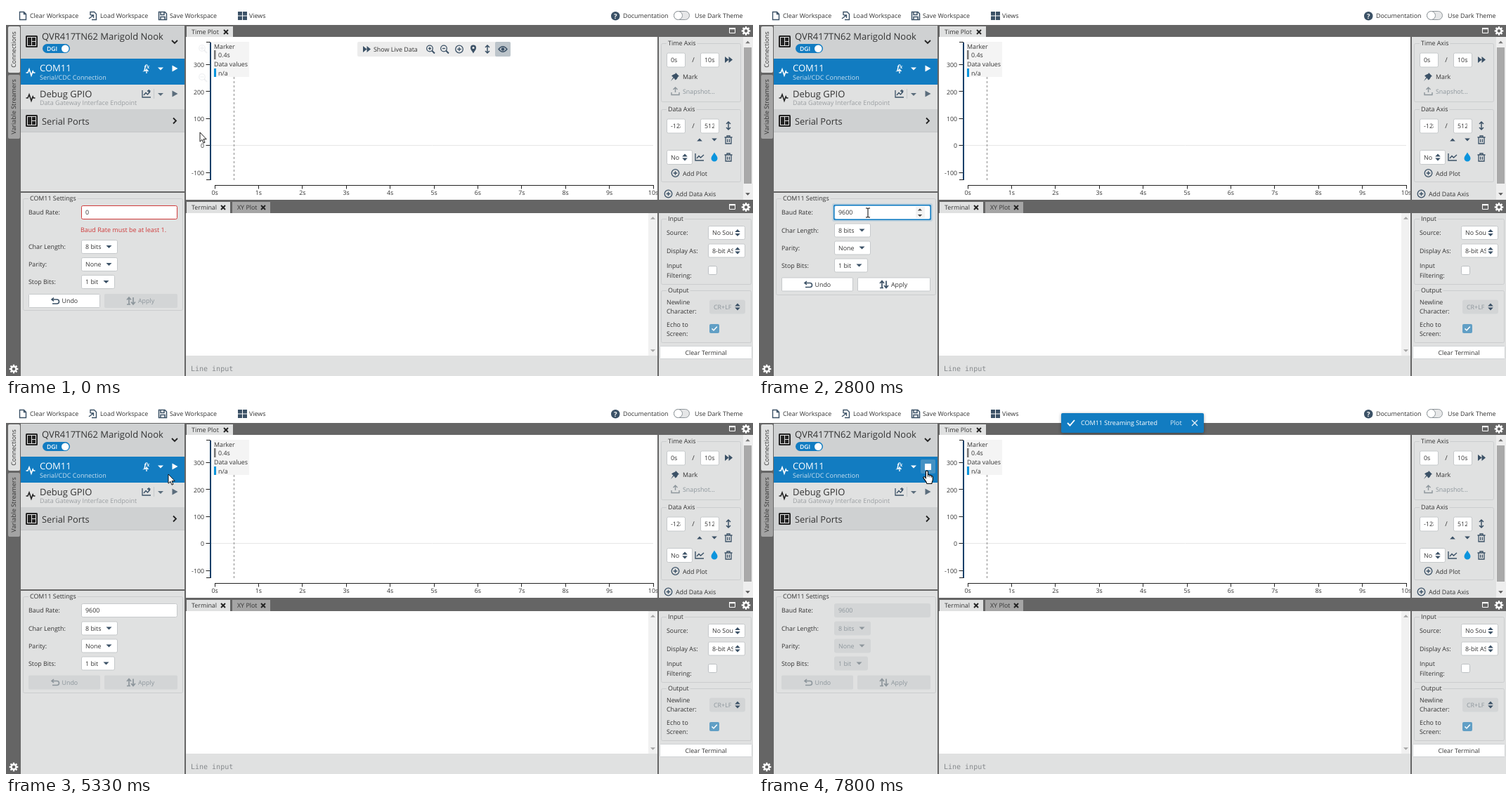
Animation of 1063 by 527 pixels, one loop 8 s. Source, as an HTML page with a canvas:

```html
<!DOCTYPE html>
<html lang="en">
<head>
<meta charset="utf-8">
<title>Serial streaming</title>
<style>
html, body { margin: 0; width: 100%; height: 100%; overflow: hidden; background: #fff; }
canvas { display: block; }
</style>
</head>
<body>
<canvas id="stage" width="1063" height="527"></canvas>
<script>
const ctx = document.getElementById('stage').getContext('2d');
const LOOP = 8000, STEP = 200 / 3;
const SANS = '"Open Sans", "Noto Sans", sans-serif';
const SERIF = '"Noto Serif", serif';
const MONO = '"DejaVu Sans Mono", monospace';
const INK = '#333', SLATE = '#3b5166', BLUE = '#127cc1', PANEL = '#e0e1e1', DARK = '#656565',
  HEAD = '#cfd1d2', OFF = '#d3d5d6', MUTED = '#8d969c', EDGE = '#c6c9cb', RED = '#cf3a3a';

function box(x, y, w, h, fill, stroke, r = 0) {
  ctx.beginPath();
  if (stroke) ctx.roundRect(x + .5, y + .5, w - 1, h - 1, r);
  else ctx.roundRect(x, y, w, h, r);
  if (fill) { ctx.fillStyle = fill; ctx.fill(); }
  if (stroke) { ctx.strokeStyle = stroke; ctx.lineWidth = 1; ctx.stroke(); }
}

// y is the middle of the capitals
function text(s, x, y, color = INK, size = 8.9, align = 'left', weight = 400, family = SANS) {
  ctx.font = `${weight} ${size}px ${family}`;
  ctx.textAlign = align;
  ctx.fillStyle = color;
  ctx.fillText(s, x, y + size * .36);
}

function clipped(s, x, y, w, color) {
  ctx.save();
  ctx.beginPath();
  ctx.rect(x, y - 8, w, 16);
  ctx.clip();
  text(s, x, y, color);
  ctx.restore();
}

function line(x1, y1, x2, y2, color, width = 1) {
  ctx.beginPath();
  ctx.moveTo(x1, y1);
  ctx.lineTo(x2, y2);
  ctx.strokeStyle = color;
  ctx.lineWidth = width;
  ctx.stroke();
}

function icon(d, x, y, stroke, width = 1.3, fill) {
  const p = new Path2D(d);
  ctx.save();
  ctx.translate(x, y);
  if (fill) { ctx.fillStyle = fill; ctx.fill(p); }
  if (stroke) { ctx.strokeStyle = stroke; ctx.lineWidth = width; ctx.stroke(p); }
  ctx.restore();
}
const solid = (d, x, y, color) => icon(d, x, y, null, 0, color);

const down = (x, y, c, r = 4) => solid(`M${-r} ${-r / 2}H${r}L0 ${r / 2}Z`, x, y, c);
const up = (x, y, c, r = 4) => solid(`M${-r} ${r / 2}H${r}L0 ${-r / 2}Z`, x, y, c);
const play = (x, y, c) => solid('M-3.5 -4.5L4.5 0L-3.5 4.5Z', x, y, c);
const cross = (x, y, c, r = 3, w = 1.9) => icon(`M${-r} ${-r}L${r} ${r}M${r} ${-r}L${-r} ${r}`, x, y, c, w);
const sorter = (x, y, c) => { up(x, y - 3, c, 3.8); down(x, y + 3, c, 3.8); };
const forward = (x, y) => solid('M-5.5 -4.5L0 0L-5.5 4.5ZM0 -4.5L5.5 0L0 4.5Z', x, y, SLATE);
const updown = (x, y) => icon('M0 -5V5M-3 -2.5L0 -5.5L3 -2.5M-3 2.5L0 5.5L3 2.5', x, y, SLATE, 1.5);
const pulse = (x, y, c) => icon('M-6.5 1H-4L-2 -4L1 5L3.2 -1L4.2 1H6.5', x, y, c, 1.6);
const pin = (x, y) => solid('M0 6C-2 2 -4 1 -4 -2A4 4 0 0 1 4 -2C4 1 2 2 0 6ZM0 -.4A1.6 1.6 0 1 0 0 -3.6A1.6 1.6 0 1 0 0 -.4', x, y, SLATE);

function ring(x, y, mark, r = 5.3) {
  ctx.beginPath();
  ctx.arc(x, y, r, 0, 7);
  ctx.strokeStyle = SLATE;
  ctx.lineWidth = 1.3;
  ctx.stroke();
  icon(mark, x, y, SLATE, 1.4);
}
const PLUS = 'M-2.8 0H2.8M0 -2.8V2.8', MINUS = 'M-2.5 0H2.5';

function lens(x, y, mark) {
  ring(x - 1, y - 1, mark, 4.3);
  line(x + 2, y + 2, x + 6, y + 6, SLATE, 1.9);
}

function gear(x, y) {
  ctx.save();
  ctx.translate(x, y);
  ctx.strokeStyle = '#fff';
  ctx.lineWidth = 2.4;
  ctx.beginPath();
  ctx.arc(0, 0, 3.5, 0, 7);
  ctx.stroke();
  for (let i = 0; i < 8; i++) {
    ctx.rotate(Math.PI / 4);
    line(4, 0, 6.3, 0, '#fff', 2.3);
  }
  ctx.restore();
}

function trash(x, y) {
  icon('M-5.5 -3.5H5.5M-2 -4V-5.5H2V-4M-4 -3V5.5H4V-3M-1.4 -1V3.5M1.4 -1V3.5', x, y, SLATE, 1.3);
}

function board(x, y) {
  box(x - 8.5, y - 8.5, 17, 17, '#222', null, 1.5);
  box(x - 6.5, y - 6.5, 13, 13, PANEL);
  box(x - 5.5, y - 5.5, 5, 11, '#222');
  box(x + .5, y - 5.5, 5, 5, '#222');
  box(x + .5, y + .5, 5, 5, '#222');
}

function group(title, x, y, w, h) {
  box(x, y, w, h, null, '#cbcdce', 2);
  ctx.font = `8.9px ${SANS}`;
  box(x + 8, y - 1, ctx.measureText(title).width + 4, 3, PANEL);
  text(title, x + 10, y);
}

function toolbar() {
  box(0, 0, 1063, 27, '#fff');
  icon('M-4.5 -5.5H1.5L4.5 -2.5V5.5H-4.5ZM1.5 -5.5V-2.5H4.5', 24, 14, SLATE, 1.4);
  icon('M-4 -1V-5.5H1.5L4.5 -2.5V5.5H-2M-6 4L0 -.5M-3.5 -1H.5V3', 124, 14, SLATE, 1.4);
  icon('M-5.5 -5.5H3L5.5 -3V5.5H-5.5ZM-3 -5V-1.5H2V-5M-3 5V1.5H3V5', 223, 14, SLATE, 1.5);
  for (let i = 0; i < 4; i++) box(330 + i % 2 * 7, 8 + (i >> 1) * 6.5, 6, 5.5, SLATE);
  [['Clear Workspace', 34], ['Load Workspace', 134], ['Save Workspace', 233], ['Views', 346],
    ['Documentation', 878], ['Use Dark Theme', 980]].forEach(([s, x]) => text(s, x, 14));
  box(861, 8, 12.5, 12.5, SLATE, null, 6.2);
  text('?', 867.2, 14.2, '#fff', 9.5, 'center', 700);
  box(950, 7, 23, 13, '#e6e7e8', '#8f969b', 6);
  box(950, 7, 13, 13, '#fff', '#8f969b', 6);
}

function sideTab(label, y, h, fill) {
  box(3, y, 17, h, fill, null, 2);
  ctx.save();
  ctx.translate(11, y + h / 2);
  ctx.rotate(-Math.PI / 2);
  text(label, 0, 0, INK, 8.9, 'center');
  ctx.restore();
}

function tab(label, x, y, w, fill) {
  box(x, y, w, 16, fill);
  text(label, x + 7, y + 8);
  cross(x + w - 10, y + 8, '#222');
}

function frame() {
  box(0, 27, 1063, 500, DARK);
  sideTab('Connections', 29, 66, PANEL);
  sideTab('Variable Streamers', 98, 91, '#a3a3a3');
  gear(11, 517);
  box(21, 28, 233, 236, PANEL);
  box(21, 266, 233, 261, PANEL);
  tab('Time Plot', 257, 29, 66, PANEL);
  tab('Terminal', 257, 279, 62, PANEL);
  tab('XY Plot', 322, 279, 54, '#a5a5a5');
  for (const y of [35, 286]) {
    box(1029, y - 4, 9, 8, null, '#fff');
    box(1029, y - 4, 9, 2.2, '#fff');
    gear(1053, y + .5);
  }
  box(256, 44, 671, 232, '#fff');
  box(256, 295, 658, 203, '#fff');
  box(914, 295, 13, 203, '#f1f1f1');
  up(920.5, 302, '#a5a5a5', 3.5);
  down(920.5, 491, '#a5a5a5', 3.5);
  box(256, 498, 671, 29, PANEL);
  text('Line input', 263, 516, '#85898c', 10, 'left', 400, MONO);
  box(929, 44, 134, 232, PANEL);
  box(929, 295, 134, 232, PANEL);
}

function connections(s) {
  box(21, 28, 233, 47, HEAD);
  board(36.5, 50.5);
  text('QVR417TN62 Marigold Nook', 51, 43, INK, 13);
  box(52, 54, 39, 13, BLUE, null, 6.5);
  text('DGI', 58, 60.5, '#fff', 8.6, 'left', 600);
  box(79, 55.5, 10.5, 10.5, '#fff', null, 5.3);
  icon('M-4 -2L0 2L4 -2', 240, 51, '#222', 1.8);

  box(21, 75, 233, 37, BLUE);
  pulse(35, 94, '#fff');
  text('COM11', 48, 88, '#fff', 13);
  text('Serial/CDC Connection', 48, 102, '#c9e0f0', 9);
  text('f', 196, 87, '#fff', 10, 'left', 'italic 700', SERIF);
  text('x', 200, 86, '#fff', 7.5, 'left', 'italic 700', SERIF);
  icon('M0 5V0M-2.5 2L0 -.8L2.5 2', 200, 91, '#fff', 1.3);
  down(220, 89.5, '#fff');
  if (s.overPlay) box(230, 79, 21, 20, s.pressed ? 'rgba(0,40,80,.3)' : 'rgba(200,200,200,.28)', null, 2);
  if (s.live) box(236, 85, 9, 9, '#fff');
  else play(240, 89, '#fff');

  box(21, 112, 233, 35, s.row === 1 ? '#d4d6d7' : PANEL);
  pulse(35, 130, '#222');
  text('Debug GPIO', 48, 125, INK, 13);
  text('Data Gateway Interface Endpoint', 48, 138, '#9b9fa2', 9);
  icon('M-6 -5V5H6M-4 2L-1 -1.5L1.5 1L5 -3M1 -4H5.5M3.3 -6V-1.5', 200, 125, SLATE, 1.3);
  line(210.5, 118, 210.5, 132, '#c5c8ca');
  down(220, 126, '#5b6d7c');
  play(240, 125, '#5b6d7c');

  box(21, 147, 233, 33, s.row === 2 ? '#c5c7c8' : HEAD);
  board(36.5, 163.5);
  text('Serial Ports', 51, 164, INK, 12.8);
  icon('M-2 -4L2 0L-2 4', 240, 163.5, '#222', 1.8);
  line(21, 179.5, 254, 179.5, '#c4c6c7');
}

function picker(label, value, y, w, s) {
  text(label, 32, y);
  const hover = !s.live && inside(s.mouse, 107, y - 10, w, 20);
  box(107, y - 10, w, 20, s.live ? OFF : hover ? '#e6e8e9' : '#fff', s.live ? OFF : EDGE, 2);
  text(value, 113, y, s.live ? MUTED : INK);
  down(107 + w - 12.5, y, s.live ? MUTED : SLATE, 4);
}

function button(x, y, w, on, hover) {
  box(x, y - 10, w, 20, !on ? OFF : hover ? '#cdd0d2' : '#fff', !on ? OFF : hover ? '#aeb3b7' : EDGE, 1);
  return on ? SLATE : MUTED;
}

function baudField(s) {
  const accent = s.valid ? BLUE : RED;
  text('Baud Rate:', 32, 294);
  if (s.focus) {
    ctx.globalAlpha = .15;
    box(104, 281, 143, 26, accent, null, 3);
    ctx.globalAlpha = 1;
    box(106, 283, 139, 22, accent, null, 2);
  }
  box(107, 284, 137, 20, s.live ? OFF : '#fff', s.live ? OFF : !s.valid ? RED : s.focus ? '#6fb0dc' : EDGE, 2);
  text(s.value, 113, 294, s.live ? MUTED : INK);
  if (s.caret) box(Math.round(113.5 + ctx.measureText(s.value).width), 287, 1, 13, '#000');
  if (s.focus || (s.kind === 'beam' && !s.live)) {
    box(223, 286, 13, 16, '#f3f3f3');
    up(229, 290, '#444', 3.2);
    down(229, 298.5, '#444', 3.2);
  }
}

function settings(s) {
  const dy = s.valid ? 0 : 23.5;
  group('COM11 Settings', 24, 274, 228, 138 + (s.valid ? 0 : 22));
  baudField(s);
  if (!s.valid) text('Baud Rate must be at least 1.', 106, 318.5, RED, 9);
  picker('Char Length:', '8 bits', 319.5 + dy, 52, s);
  picker('Parity:', 'None', 344.5 + dy, 52, s);
  picker('Stop Bits:', '1 bit', 369.5 + dy, 48, s);

  const y = 396.5 + dy;
  let c = button(32, y, 102, !s.applied);
  icon('M-2 -4.5L-5 -2L-2 .5M-5 -2H2.5A3 3 0 0 1 2.5 4H-4', 70, y, c, 1.6);
  text('Undo', 79.5, y, s.applied ? MUTED : INK);
  const on = s.valid && !s.applied;
  c = button(140, y, 104, on, s.overApply);
  icon('M-3 5V-4M-6 -1.5L-3 -5L0 -1.5M3 -5V4M0 1.5L3 5L6 1.5M-6 5H-1', 178, y, c, 1.7);
  text('Apply', 188, y, on ? INK : MUTED);
}

function plot(s) {
  line(292, 198.5, 921, 198.5, '#e6e6e6');
  ctx.setLineDash([3, 3]);
  line(324.5, 101, 324.5, 248, '#999', 1.2);
  ctx.setLineDash([]);
  box(290, 52, 2, 196, '#123f68');
  for (const y of [52, 248]) line(285, y - .5, 291, y - .5, '#222');
  [300, 200, 100, 0, -100].forEach((v, i) => {
    const y = 84 + i * 38.4;
    line(284.5, Math.round(y) - .5, 290, Math.round(y) - .5, '#222');
    text(String(v), 282, y, INK, 8.8, 'right');
  });
  line(297, 255.5, 921, 255.5, '#222');
  ctx.save();
  ctx.beginPath();
  ctx.rect(256, 44, 671, 232);
  ctx.clip();
  for (let i = 0; i <= 10; i++) {
    const x = 297 + i * 62.4;
    line(Math.floor(x) + .5, 255, Math.floor(x) + .5, 260.5, '#222');
    text(i + 's', x, 266, INK, 8.8, 'center');
  }
  ctx.restore();
  box(295, 51, 51, 50, 'rgba(243,243,243,.9)');
  text('Marker', 296, 57.5);
  box(296, 63, 2.5, 13, '#777');
  text('0.4s', 302, 70);
  text('Data values', 296, 82.5);
  box(296, 89, 3, 12, '#0a94dd');
  text('n/a', 302, 95.5);
  if (s.overPlot) plotTools();
}

function plotTools() {
  ctx.globalAlpha = .08;
  lens(280, 61, PLUS);
  lens(280, 102, MINUS);
  ctx.globalAlpha = 1;
  box(500, 51, 218, 21, '#ececec', null, 2);
  forward(513.5, 61.5);
  text('Show Live Data', 523, 61.5);
  lens(604, 61.5, 'M-2 0H2M0 -2V2');
  lens(624, 61.5, 'M-2 0H2');
  ring(645, 61.5, PLUS);
  pin(665, 61.5);
  updown(685, 61.5);
  box(696, 51, 22, 21, '#bcc4ca', null, 2);
  icon('M-6 0Q0 -7.5 6 0Q0 7.5 -6 0Z', 707, 61.5, SLATE, 1.4);
  box(704.7, 59.2, 4.6, 4.6, SLATE, null, 2.3);
}

function pair(a, b, y) {
  [[a, 940], [b, 988]].forEach(([v, x]) => {
    box(x, y - 10, 27, 21, '#fff', EDGE, 2);
    clipped(v, x + 6, y, 14);
  });
  text('/', 978, y, INK, 9.5, 'center');
}

function axisPanel() {
  group('Time Axis', 932, 53, 114, 84);
  pair('0s', '10s', 76.5);
  forward(1028.5, 76.5);
  solid('M1 -6L6 -1L4.5 -.5L2.5 3L.5 4.5L-1.5 1.5L-6 6L-2.5 .5L-5 -1.5L-3 -3L.5 -4.5Z', 952, 101, SLATE);
  text('Mark', 963, 101);
  icon('M0 2V-5M-3 -2L0 -5L3 -2M-5.5 2V5.5H5.5V2', 952.5, 121, MUTED, 1.4);
  text('Snapshot...', 963, 121.5, MUTED);
  group('Data Axis', 932, 147, 114, 104);
  pair('-128', '512', 170.5);
  updown(1028, 170.5);
  up(987, 190.5, SLATE, 3.8);
  down(1008, 190.5, SLATE, 3.8);
  trash(1028, 190.5);
  box(940, 205, 37, 21, '#fff', EDGE, 2);
  clipped('None', 946, 215.5, 12);
  sorter(966, 215.5, SLATE);
  icon('M-6 -5V5H6M-4 2L-1 -1.5L1.5 1L6 -3', 987, 215, SLATE, 1.4);
  solid('M0 -6.5C2 -3 4.5 -1 4.5 2A4.5 4.5 0 0 1 -4.5 2C-4.5 -1 -2 -3 0 -6.5Z', 1008, 215, '#0a94dd');
  trash(1028, 215.5);
  ring(952.5, 238, PLUS);
  text('Add Plot', 963, 238.5);
  ring(942.5, 267.5, PLUS);
  text('Add Data Axis', 953, 268);
  box(1049, 44, 14, 232, '#eeeeee');
  box(1050, 59, 11, 194, '#a9a9a9');
  up(1055.5, 51.5, '#777', 3.3);
  down(1055.5, 268, '#555', 3.3);
}

function choice(value, y, off) {
  const x = off ? 1001 : 999;
  box(x, y - 10, 1052 - x, 20, off ? OFF : '#fff', off ? OFF : EDGE, 2);
  clipped(value, x + 6, y, 30, off ? MUTED : INK);
  sorter(1041, y, SLATE);
}

function terminalPanel() {
  group('Input', 932, 303, 129, 94);
  group('Output', 932, 405, 129, 75);
  [['Source:', 323], ['Display As:', 348.5], ['Input', 370], ['Filtering:', 383.5], ['Newline', 421.5],
    ['Character:', 435], ['Echo to', 453.5], ['Screen:', 467]].forEach(([s, y]) => text(s, 940, y));
  choice('No Source', 323);
  choice('8-bit ASCII', 348.5);
  box(999, 370, 13, 13, '#fff', '#bbbfc2', 2);
  choice('CR+LF', 428.5, true);
  box(1001, 453, 14, 13, '#619fc5', null, 2);
  icon('M-3.5 0L-1 2.5L3.8 -2.8', 1008, 459.5, '#fff', 1.5);
  box(930, 484, 132, 19, '#fff', '#d0d3d5', 1);
  text('Clear Terminal', 996, 493.5, INK, 8.8, 'center');
}

function toast(q) {
  const p = Math.min(1, (q - 7460) / 340), e = 1 - (1 - p) ** 2;
  ctx.save();
  ctx.globalAlpha = e;
  ctx.translate(0, -30 * (1 - e));
  ctx.shadowColor = 'rgba(0,0,0,.35)';
  ctx.shadowBlur = 4;
  ctx.shadowOffsetY = 1;
  box(430, 13, 203, 28, BLUE, null, 2);
  ctx.shadowColor = 'transparent';
  icon('M-5 0L-1.5 3.5L5 -4', 444, 27, '#fff', 1.9);
  text('COM11 Streaming Started', 458, 27, '#fff', 9, 'left', 500);
  text('Plot', 585, 27, '#dcebf6', 9.2, 'left', 500);
  cross(620, 27, '#e4eff7', 4, 1.4);
  ctx.restore();
}

function pointer({ x, y }, kind) {
  if (kind === 'beam') {
    icon('M-3 -6.5H-1Q0 -6.5 0 -5.5Q0 -6.5 1 -6.5H3M0 -6V6M-3 6.5H-1Q0 6.5 0 5.5Q0 6.5 1 6.5H3', x, y, '#000', 1);
  } else if (kind === 'hand') {
    icon('M-1.6 1.5C-1.6 -.4 1.4 -.4 1.4 1.5V6C2.3 5.4 3.8 5.6 4 6.6C5 6 6.2 6.4 6.4 7.5C7.6 7.2 8.3 8 8.3 9.2V12.5C8.3 15 7 16 6.8 18.5H0C-.5 15.5 -3.6 13 -5.2 10C-5.4 8.5 -3.2 8 -1.6 10.4Z', x, y, '#000', 1.1, '#fff');
    icon('M1.4 6V9M4 6.6V9.3M6.4 7.5V9.8', x, y, '#000', .8);
  } else {
    icon('M0 0V13.2L3 10.4L5 15.2L7 14.3L5 9.7H9.2Z', x, y, '#000', .9, '#fff');
  }
}

const PATH = [[0, 276, 180], [470, 154.5, 294], [2660, 154.5, 294], [2800, 155, 294.5], [3000, 155, 294.5],
  [3530, 184, 396], [3930, 184, 396.5], [4070, 183, 380], [4820, 183, 380], [5330, 231, 100],
  [5530, 239, 95], [LOOP, 239, 95]];

function mouseAt(q) {
  const i = PATH.findIndex(k => k[0] > q), [t0, x0, y0] = PATH[i - 1], [t1, x1, y1] = PATH[i];
  const p = (q - t0) / (t1 - t0), e = p * p * (3 - 2 * p);
  return { x: x0 + (x1 - x0) * e, y: y0 + (y1 - y0) * e };
}

const inside = (m, x, y, w, h) => m.x >= x && m.x < x + w && m.y >= y && m.y < y + h;
const typed = t => '9600'.slice(0, t < 1800 ? 1 : t < 2000 ? 2 : t < 2200 ? 3 : 4);

function state(t, q) {
  const mouse = mouseAt(q), s = { mouse };
  s.focus = t >= 670 && t < 4000;
  s.valid = t >= 1670;
  s.applied = t >= 4000;
  s.live = t >= 7530;
  s.value = t < 1470 ? '0' : typed(t);
  s.caret = t >= 1130 && t < 2730 || t >= 3200 && t < 3730;
  s.overPlot = inside(mouse, 256, 44, 671, 232);
  s.overPlay = inside(mouse, 230, 79, 21, 20);
  s.overApply = s.valid && !s.applied && inside(mouse, 140, 386, 104, 21);
  s.pressed = t >= 6400 && t < 6470;
  s.row = inside(mouse, 21, 112, 233, 35) ? 1 : inside(mouse, 21, 147, 233, 33) ? 2 : 0;
  s.kind = inside(mouse, 107, 284, 137, 20) ? 'beam' : s.overPlay || s.overApply ? 'hand' : 'arrow';
  return s;
}

function draw(t) {
  // pointer and toast advance at 15 steps a second
  const q = Math.min(LOOP - 1, Math.round(Math.floor((t + 4) / STEP) * STEP / 10) * 10);
  const s = state(t, q);
  ctx.textRendering = 'geometricPrecision';
  frame();
  toolbar();
  connections(s);
  settings(s);
  plot(s);
  axisPanel();
  terminalPanel();
  if (t >= 5930 && t < 6400) {
    box(237, 115, 118, 20, '#fff', '#8a8a8a');
    text('Start streaming on COM11', 243, 125, '#575757');
  }
  if (s.live) toast(q);
  pointer(s.mouse, s.kind);
}

const start = performance.now();
function tick() {
  draw((performance.now() - start) % LOOP);
  requestAnimationFrame(tick);
}
tick();
</script>
</body>
</html>
```
